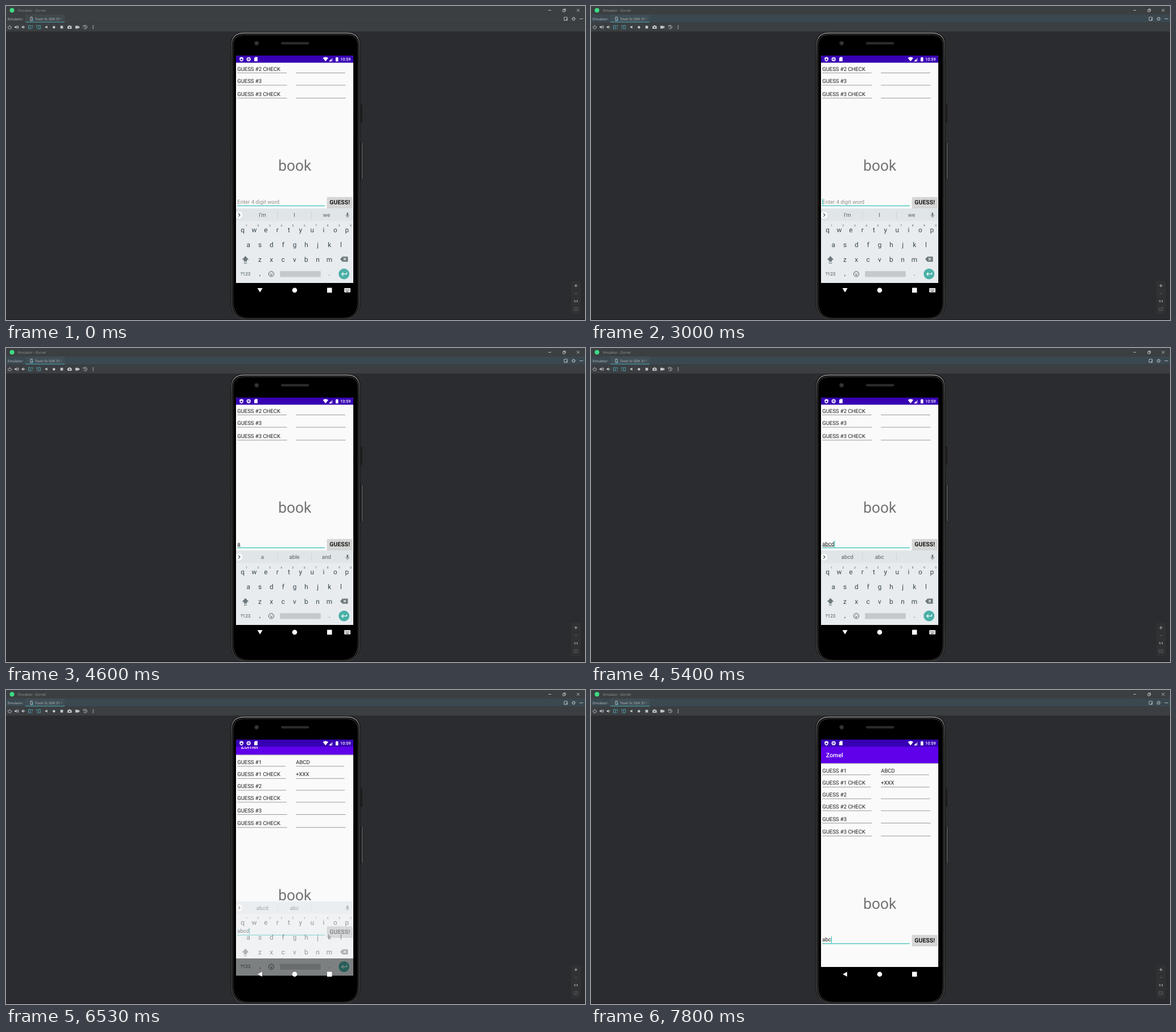
Write an HTML page that moves like this. It is 1017x551 px and loops after 8000 ms.

```html
<!DOCTYPE html>
<html lang="en">
<head>
<meta charset="utf-8">
<title>Emulator</title>
<style>
  html, body { margin: 0; width: 100%; height: 100%; overflow: hidden; background: #2b2c2f; }
  svg { display: block; width: 100%; height: 100%; }
  text { font-family: Roboto, sans-serif; text-rendering: geometricPrecision; white-space: pre; }
  .ui text { font-family: "Open Sans", sans-serif; font-size: 6px; fill: #c3c6c8; }
  .ui .dim { fill: #8d9092; }
  .line { fill: none; stroke: #c3c6c8; stroke-width: .9; }
  .fill { fill: #c3c6c8; }
  .teal { stroke: #4fa9b8; }
  .row { font-size: 9.5px; fill: #1d1d1d; }
  .rule { stroke: #707070; stroke-width: .7; }
  .mid { text-anchor: middle; }
  .key { font-size: 11.9px; fill: #37474f; text-anchor: middle; }
  .num { font-size: 5px; fill: #4d5a60; text-anchor: middle; }
  .word { font-size: 9.7px; fill: #566167; text-anchor: middle; }
</style>
</head>
<body>
<svg viewBox="0 0 1017 551" preserveAspectRatio="none">
  <defs>
    <clipPath id="screen"><path d="M404 486V90q0-3 3-3h200q3 0 3 3v396z"/></clipPath>
    <clipPath id="keysArea"><rect x="404" y="340" width="206" height="171"/></clipPath>
    <linearGradient id="edge" x1="0" y1="0" x2="0" y2="1">
      <stop offset="0" stop-color="#9a9a9a"/><stop offset=".03" stop-color="#555"/>
      <stop offset=".1" stop-color="#3c3c3c"/><stop offset="1" stop-color="#464646"/>
    </linearGradient>
    <linearGradient id="drop" x1="0" y1="0" x2="0" y2="1">
      <stop offset="0" stop-color="#000" stop-opacity=".28"/><stop offset="1" stop-color="#000" stop-opacity="0"/>
    </linearGradient>
  </defs>

  <rect width="1017" height="551" fill="#2b2c2f"/>

  <!-- window chrome -->
  <g class="ui">
    <rect width="1017" height="45" fill="#3c3f41"/>
    <rect id="header" y="15" width="1017" height="14.2" fill="#3c3f41"/>
    <rect y="29" width="1017" height=".6" fill="#323537"/>
    <rect y="44.4" width="1017" height=".6" fill="#323537"/>
    <circle cx="10.5" cy="7.5" r="4" fill="#3ddc84"/>
    <text id="title" class="dim" x="21" y="9.8">Emulator - Zornel</text>
    <g class="line" stroke-width=".7">
      <path d="M952.5 7.5h5M978 6.5h3.6v3.6h-3.6zM979.2 6.3V5.2h3.6v3.6h-1M1002.6 5.1l4.8 4.8m0-4.8l-4.8 4.8"/>
    </g>
    <text x="3" y="24.7">Emulator:</text>
    <rect x="34" y="15" width="69" height="13.4" fill="#4b5a62" opacity=".35"/>
    <rect x="34" y="27.6" width="69" height="1.5" fill="#4a8b94"/>
    <path class="line" d="M43 19.5h3.2v6.2H43z"/>
    <circle cx="46.6" cy="24.6" r="1.4" fill="#4fa9b8"/>
    <text x="51" y="24.7">Tovin 5c SDK 31</text>
    <path d="M95.3 20.9l3 3m0-3l-3 3" stroke="#777b7d" stroke-width=".6"/>
    <path class="line" d="M980.3 19.7h5.6v5.6h-5.6zM984.3 25v-2.2h2"/>
    <circle class="line" cx="997" cy="22.5" r="2" stroke-width="1.6"/>
    <circle class="line" cx="997" cy="22.5" r="3" stroke-dasharray="1.2 1.16"/>
    <path class="line" d="M1007.5 22.5h6"/>

    <!-- tool buttons -->
    <path class="line" d="M4.9 35.1a2.8 2.8 0 1 0 3.2 0M6.5 33.6v3.2"/>
    <path class="fill" d="M15 36h1.6l2-2v6l-2-2H15zM27.5 36h1.6l2-2v6l-2-2h-1.6z"/>
    <path class="line" d="M19.8 35.4q1.3 1.6 0 3.2M20.8 34q2.4 3 0 6M32.3 35.6q1.1 1.4 0 2.8"/>
    <path class="line teal" d="M39.5 34.2h3.4v5.8h-3.4zM44.4 34.4h2v3M46.4 39.8h-2"/>
    <path class="line teal" d="M57 34.2h3.4v5.8H57zM55.8 34.4h-2v3M53.8 39.8h2"/>
    <path class="fill" d="M68 37l4.6-2.6v5.2zM95.6 34.8h4.6v4.6h-4.6zM108 35.2h1.8l.8-1.2h2.2l.8 1.2h1.8v4.8H108zM121.8 34.8h5v1.5l2.2-1.3v4.2l-2.2-1.3v1.5h-5z"/>
    <circle class="fill" cx="84.2" cy="37.2" r="2.2"/>
    <circle cx="111.7" cy="37.4" r="1.2" fill="#3c3f41"/>
    <path class="line" d="M136.6 35.2a3.1 3.1 0 1 1-.2 3.2M136 33.8v2h2M139.4 35.4v1.9l1.4.8"/>
    <path class="fill" d="M152.4 34h1.4v1.4h-1.4zM152.4 36.4h1.4v1.4h-1.4zM152.4 38.8h1.4v1.4h-1.4z"/>

    <!-- zoom panel -->
    <rect x="993.5" y="483.5" width="15" height="56" rx="1" fill="#2f3133" stroke="#37393b" stroke-width=".6"/>
    <path class="line" d="M998.3 490.8h5.4M1001 488.1v5.4"/>
    <path d="M998.4 504.4h5.2M997.8 529.3h6.4v5.2h-6.4zM999.5 533l3-2.2" fill="none" stroke="#64676a" stroke-width=".8"/>
    <text class="mid" x="1001" y="520" font-weight="700" style="font-size:5.4px">1:1</text>
  </g>

  <!-- phone body -->
  <rect x="622" y="173" width="4" height="32" rx="1" fill="#1d1d1f"/>
  <rect x="622" y="239" width="4" height="66" rx="1" fill="#1c1c1e"/>
  <rect x="625" y="240" width=".9" height="64" fill="#77797b"/>
  <path d="M394 69q0-23 23-23h183q23 0 23 23v449q0 33-30 33H424q-30 0-30-33z" fill="#161617"/>
  <path d="M396 70q0-22.5 22-22.5h181q22 0 22 22.5v448q0 32-28 32H424q-28 0-28-32z" fill="#090909" stroke="url(#edge)" stroke-width="1.5"/>
  <path d="M398.6 71q0-20.5 20-20.5h180q20 0 20 20.5v446q0 31-27 31H425.600q-27 0-27-31z" fill="#000" stroke="#4a4a4a" stroke-width=".9"/>
  <circle cx="440.200" cy="65.300" r="3.900" fill="#2a2a2b"/>
  <circle cx="440.200" cy="65.300" r="1.800" fill="#3d3f42"/>
  <rect x="483" y="63.200" width="49.500" height="4.200" rx="2.100" fill="#2b2b2b"/>

  <!-- app -->
  <g clip-path="url(#screen)">
    <g id="app">
      <rect x="404" y="87" width="206" height="399" fill="#fafafa"/>
      <rect x="404" y="87" width="206" height="41.500" fill="#6000ea"/>
      <rect x="404" y="128.500" width="206" height="2" fill="url(#drop)"/>
      <text x="412.700" y="118.300" font-size="10.500" font-weight="500" fill="#fff">Zornel</text>
      <g id="rows"></g>
      <text class="mid" x="507.300" y="383.600" font-size="26.300" fill="#737373">book</text>
      <text id="entry" class="row" x="406.300" y="441.200"></text>
      <rect id="compose" x="406.500" y="442.100" height=".8" fill="#1d1d1d"/>
      <rect x="406" y="444.500" width="154" height="1.200" fill="#2fbdb4"/>
      <rect id="caret" y="432.500" width="1.100" height="11.800" fill="#25c8bd"/>
      <rect id="shadow" x="563.600" y="430.600" width="45.400" height="19.200" rx="1.500" fill="#000"/>
      <rect id="button" x="564" y="429.800" width="44.500" height="18.600" rx="1.200"/>
      <text class="mid" x="586.200" y="442.900" font-size="10.500" font-weight="600" fill="#171717">GUESS!</text>
    </g>
    <rect x="404" y="87" width="206" height="12.500" fill="#3700b3"/>
    <path d="M410.300 90.800l3.300-1.200 3.300 1.200v2.400q0 3-3.300 4.200-3.300-1.200-3.300-4.200zM436 91.400l1.800-1.800h4v7.400H436z" fill="#fff"/>
    <path d="M413.600 91.400l.7 1.500 1.500.3-1.100 1 .3 1.500-1.400-.8-1.400.8.300-1.500-1.100-1 1.500-.3z" fill="#3700b3"/>
    <circle cx="426.200" cy="93.300" r="3" fill="#8f75d4" stroke="#fff" stroke-width="1.300"/>
    <path d="M556.600 91.300q4.700-3.400 9.400 0l-4.700 5.900zM579 90.600h1.300v-.9h2v.9h1.300v6.700H579z" fill="#fff"/>
    <path d="M567.200 97.200h6.600v-6.600z" fill="#8f75d4"/>
    <path d="M567.200 97.200h4.300v-4.300z" fill="#fff"/>
    <text x="587.100" y="96" font-size="7.300" font-weight="500" fill="#fff">10:59</text>
  </g>

  <!-- soft keyboard -->
  <g clip-path="url(#keysArea)">
    <g id="keyboard">
      <rect x="404" y="355.400" width="206" height="130.600" fill="#e8ecef"/>
      <rect x="404" y="355.400" width="206" height="22" fill="#e0e5e8"/>
      <circle cx="409.300" cy="366.800" r="6" fill="#fff"/>
      <path d="M408.200 364l2.800 2.800-2.800 2.800" fill="none" stroke="#37474f" stroke-width="1.100"/>
      <path d="M477 360v13.500M536.500 360v13.500" stroke="#cbd0d3" stroke-width=".8"/>
      <g id="words"></g>
      <g fill="none" stroke="#6c777c">
        <path d="M599.800 364v3" stroke-width="2.800" stroke-linecap="round"/>
        <path d="M596.900 366.600q0 3.200 2.900 3.200t2.900-3.200M599.800 369.800v2.200" stroke-width=".8"/>
      </g>
      <g id="keys"></g>
      <path d="M420.500 438.800l6 6.400h-3.300v3.400h-5.400v-3.400h-3.300zM417.800 450.600h5.400v1.200h-5.400z" fill="#6c777c"/>
      <path d="M587 444.200l4-4.500h9.500v9h-9.500z" fill="#6c777c"/>
      <path d="M592.800 442l4.400 4.400m0-4.400l-4.400 4.400" stroke="#e8ecef" stroke-width="1.100"/>
      <text class="mid" x="420.500" y="473" font-size="8.200" fill="#455359">?123</text>
      <text class="key" x="446" y="473">,</text>
      <text class="key" x="568" y="473">.</text>
      <circle cx="466" cy="470.200" r="4.700" fill="none" stroke="#566167"/>
      <path d="M463.400 471.300q2.600 3.600 5.200 0z" fill="#566167"/>
      <circle cx="464.300" cy="468.800" r=".8" fill="#566167"/>
      <circle cx="467.700" cy="468.800" r=".8" fill="#566167"/>
      <rect x="481.300" y="465.300" width="71.500" height="10.200" rx="1.200" fill="#c4c9cc"/>
      <circle cx="593.700" cy="470.200" r="9.400" fill="#4ab0a7"/>
      <path d="M598.500 467.200v3.200h-8.800m2.900-2.900l-2.900 2.900 2.900 2.900" fill="none" stroke="#fff" stroke-width="1.200"/>
    </g>
  </g>

  <!-- navigation bar -->
  <g fill="#fff">
    <path id="navDown" d="M441.600 495h9l-4.500 7.600z"/>
    <path id="navBack" d="M449.800 494.400v8.600l-7.600-4.300z"/>
    <circle cx="507" cy="498.700" r="4.300"/>
    <rect x="564" y="494.500" width="8.500" height="8.500" rx=".4"/>
    <g id="navKeys">
      <rect x="594.200" y="495" width="10.800" height="7.400" rx=".8"/>
      <path d="M595.600 497h8M595.600 499h8" stroke="#000" stroke-width=".9" stroke-dasharray="1 .75"/>
      <path d="M597.300 501h4.600" stroke="#000" stroke-width=".8"/>
    </g>
  </g>
  <rect y="549.700" width="1017" height="1.300" fill="#231f24"/>
</svg>

<script>
const LOOP = 8000;
const $ = id => document.getElementById(id);

function add(parent, tag, attrs, label) {
  const el = document.createElementNS('http://www.w3.org/2000/svg', tag);
  for (const name in attrs) el.setAttribute(name, attrs[name]);
  if (label) el.textContent = label;
  return parent.appendChild(el);
}

// label, value, text baseline, rule height, rule width
[
  ['GUESS #1', 'ABCD', 144.5, 148.800, 84.500],
  ['GUESS #1 CHECK', '+XXX', 166.400, 170.300, 85.300],
  ['GUESS #2', '', 187, 190.900, 86],
  ['GUESS #2 CHECK', '', 208, 211.900, 86.700],
  ['GUESS #3', '', 229.600, 233.500, 87.400],
  ['GUESS #3 CHECK', '', 252, 256.200, 87.400]
].forEach(([label, value, y, ruleY, width]) => {
  [[406.200, label], [509.200, value]].forEach(([x, str]) => {
    add($('rows'), 'text', { class: 'row', x, y }, str);
    add($('rows'), 'path', { class: 'rule', d: `M${x} ${ruleY}h${width}` });
  });
});

[['qwertyuiop', 415.600, 396.900], ['asdfghjkl', 425.700, 422.900], ['zxcvbnm', 445.900, 448.900]]
  .forEach(([letters, x0, y], row) => [...letters].forEach((ch, i) => {
    const x = x0 + 20.350 * i;
    add($('keys'), 'text', { class: 'key', x, y }, ch);
    if (!row) add($('keys'), 'text', { class: 'num', x: x + 7, y: 387 }, String((i + 1) % 10));
  }));

const words = [450.300, 506.600, 563].map(x => add($('words'), 'text', { class: 'word', x, y: 370.300 }));

// Each track lists [start time, value]; a value holds until the next one.
const tracks = {
  focus: [[0, 0], [2930, 1]],
  typed: [[0, ''], [3130, 'a'], [4800, 'ab'], [5200, 'abc'], [5400, 'abcd'], [7800, 'abc']],
  hints: [[0, ["I'm", 'I', 'we']], [3200, ['a', 'able', 'and']], [4800, ['ab', 'able', 'an']],
          [5200, ['abc', 'ab', '']], [5400, ['abcd', 'abc', '']]],
  caret: [[0, 0], [600, 1], [1130, 0], [1600, 1], [2130, 0], [2600, 1], [3600, 0], [4000, 1], [4600, 0],
          [4800, 1], [5930, 0], [6330, 1], [6930, 0], [7400, 1]],
  pan: [[0, -94.500], [6530, -15], [6600, -.5], [6730, 0]],
  keyShift: [[0, 0], [6400, 1], [6530, 15.300]],
  keyAlpha: [[0, 1], [6400, .97], [6530, .54], [6600, 0]],
  press: [[0, 0], [6330, .6], [6400, 1], [6600, .85], [6730, .7], [6800, .5], [6930, .3], [7000, .12], [7130, 0]],
  composing: [[0, 1], [6330, 0]],
  keysOpen: [[0, 1], [6400, 0]]
};

function at(name, t) {
  let value;
  for (const [start, v] of tracks[name]) if (t >= start) value = v;
  return value;
}

const show = (id, on) => $(id).setAttribute('visibility', on ? 'visible' : 'hidden');
const widths = [0, 5.200, 10.500, 15.500, 20.800];

function draw(t) {
  const typed = at('typed', t), press = at('press', t), focus = at('focus', t), open = at('keysOpen', t);
  const width = widths[typed.length];

  $('header').setAttribute('fill', focus ? '#3a4850' : '#3c3f41');
  $('title').style.fill = focus ? '#999c9e' : '#8d9092';

  $('app').setAttribute('transform', `translate(0 ${at('pan', t)})`);
  $('entry').textContent = typed || 'Enter 4 digit word';
  $('entry').style.fill = typed ? '#1d1d1d' : '#8f8f8f';
  $('compose').setAttribute('width', width);
  show('compose', typed && at('composing', t));
  $('caret').setAttribute('x', 406.400 + width);
  show('caret', at('caret', t));

  const shade = Math.round(214 - 19 * press);
  $('button').setAttribute('fill', `rgb(${shade},${shade},${shade})`);
  $('shadow').setAttribute('opacity', .16 + .12 * press);

  $('keyboard').setAttribute('transform', `translate(0 ${at('keyShift', t)})`);
  $('keyboard').setAttribute('opacity', at('keyAlpha', t));
  at('hints', t).forEach((hint, i) => { words[i].textContent = hint; });

  show('navDown', open);
  show('navKeys', open);
  show('navBack', !open);
}

const begin = performance.now();
function tick() {
  draw((performance.now() - begin) % LOOP);
  requestAnimationFrame(tick);
}
tick();
</script>
</body>
</html>
```
